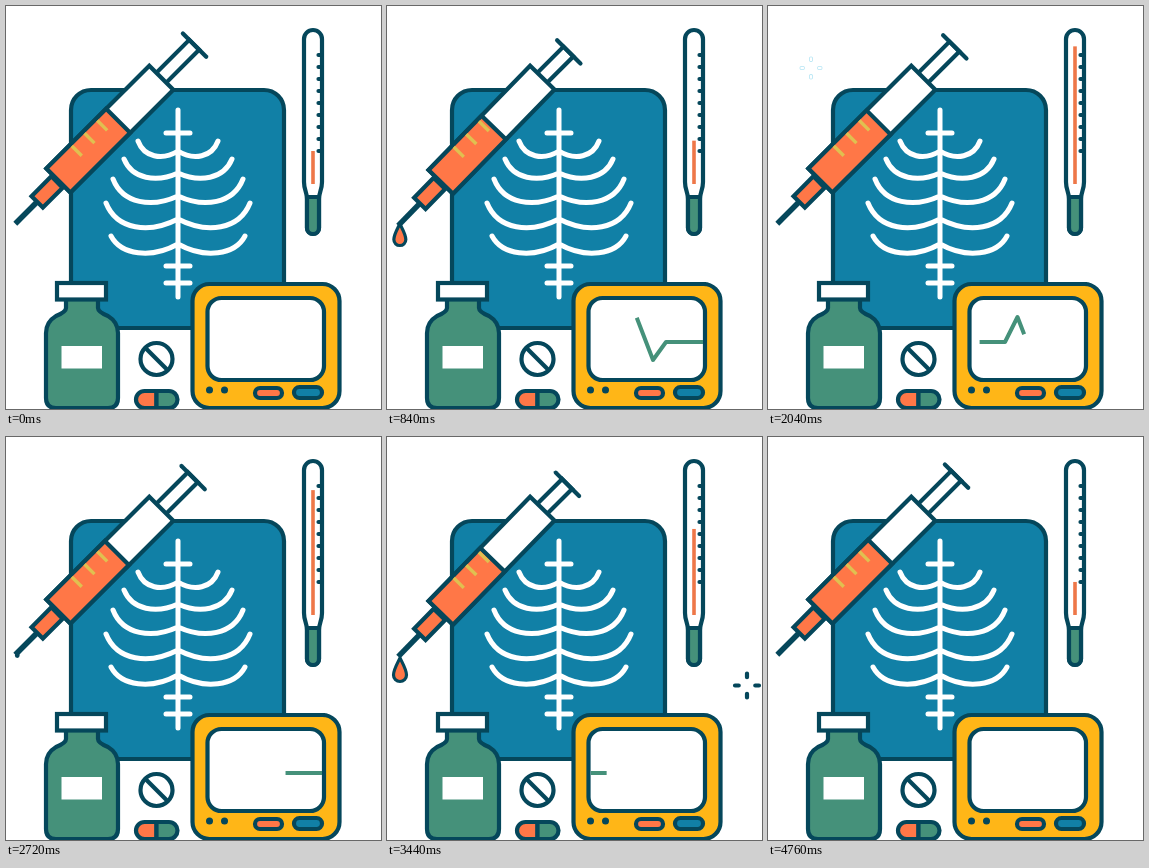
Recreate the animation shown at these times as an HTML page. Size 375x403 px, loop 4.8 s.

```html
<!DOCTYPE html>
<html>
<head>
<meta charset="utf-8">
<title>Medical tools</title>
<style>
html, body { margin: 0; width: 100%; height: 100%; overflow: hidden; background: #fff; }
svg { display: block; width: 375px; height: 403px; }
.line { stroke: #05475b; stroke-width: 4.2; }
.round { stroke-linecap: round; stroke-linejoin: round; }
.none { fill: none; }
.white { fill: #fff; }
.blue { fill: #1180a6; }
.green { fill: #45917a; }
.orange { fill: #ff7747; }
.yellow { fill: #ffb617; }
.navy { fill: #05475b; }
</style>
</head>
<body>
<svg viewBox="0 0 375 403">
  <rect class="line blue" x="65" y="84" width="213" height="238" rx="20"/>
  <path id="ribs" class="none round" stroke="#fff" stroke-width="5"/>

  <path id="drop" class="line orange round" vector-effect="non-scaling-stroke" style="stroke-width:3.2"
    d="M0 0C4 8 6.5 12 6.5 17A6.5 6.5 0 0 1-6.5 17C-6.5 12-4 8 0 0Z"/>

  <g class="line" transform="translate(10 217) rotate(-45)">
    <g id="plunger">
      <path class="white" d="M190-7H252V7H190Z"/>
      <path class="round" d="M252-16V17"/>
    </g>
    <g id="barrel">
      <path stroke-width="5.5" style="stroke-width:5.5" d="M-1 0H30"/>
      <rect class="orange" x="30" y="-8" width="28" height="16"/>
      <rect class="white" x="60" y="-17" width="145.5" height="34"/>
      <rect id="liquid" class="orange" x="60" y="-17" height="34"/>
      <path style="stroke:#e0c050;stroke-width:3.4" d="M94-15V-1M112-15V-1M130-15V-1"/>
    </g>
  </g>

  <g class="line">
    <path class="white" d="M298 33A9 9 0 0 1 316 33V176C316 184 313 186 313 193V222A6 6 0 0 1 301 222V193C301 186 298 184 298 176Z"/>
    <path class="green" d="M301 191H313V222A6 6 0 0 1 301 222Z"/>
    <path id="ticks" class="none round"/>
  </g>
  <path id="mercury" stroke="#ee7748" stroke-width="3.6"/>

  <g class="line">
    <path class="green" d="M60 293V302Q60 306 50 310Q40 316 40 327V392Q40 402 50 402H102Q112 402 112 392V327Q112 316 102 310Q92 306 92 302V293Z"/>
    <rect class="white" x="51" y="277" width="49" height="16.5"/>
    <rect class="white" x="55.5" y="340" width="40.5" height="22.5" stroke="none"/>
    <circle class="white" cx="150.5" cy="353" r="16"/>
    <path d="M139 341.5L162 364.5"/>
    <path class="orange" d="M150.5 385H138.5A8.5 8.5 0 0 0 138.5 402H150.5Z"/>
    <path class="green" d="M150.5 385H163A8.5 8.5 0 0 1 163 402H150.5Z"/>

    <rect class="yellow" x="186.5" y="278" width="147" height="124" rx="17"/>
    <rect class="white" x="201.5" y="292" width="116.5" height="82" rx="14"/>
    <rect class="orange" x="249" y="382" width="27" height="10" rx="5"/>
    <rect class="blue" x="288" y="381" width="28" height="11" rx="5.5"/>
  </g>
  <circle class="navy" cx="203.5" cy="384" r="3.5"/>
  <circle class="navy" cx="218.5" cy="384" r="3.5"/>
  <path id="pulse" class="none" stroke="#45917a" stroke-width="4" stroke-linejoin="round" pathLength="1"
    d="M203.5 336H237L249.5 311L266 354L279 336H316"/>

  <path id="sparkRight" class="line none round"/>
  <g class="none round">
    <path id="sparkLeft" stroke="#b5e5f4" stroke-width="4"/>
    <path id="sparkCore" stroke="#fff" stroke-width="2.4"/>
  </g>
</svg>
<script>
const el = id => document.getElementById(id);
const draw = (id, d) => el(id).setAttribute('d', d);
const clamp = x => Math.min(1, Math.max(0, x));
const span = (t, from, to) => clamp((t - from) / (to - from));
const ease = p => (1 - Math.cos(Math.PI * p)) / 2;

// Each row: half width, end height, sag, height at the spine.
const ribRows = [[40, 135, 16, 145], [54, 153, 20, 167], [65, 173, 25, 190], [72, 197, 27, 213], [67, 230, 19, 238]];
let ribs = 'M172 104V291M160 127H184M160 260H184M160 277H184';
for (const [w, y, sag, join] of ribRows) {
  for (const side of [-1, 1]) {
    const x = k => 172 + side * w * k;
    ribs += `M${x(1)} ${y}C${x(.85)} ${y + sag} ${x(.4)} ${y + sag + 4} ${x(0)} ${join}`;
  }
}
draw('ribs', ribs);

let ticks = '';
for (let y = 49; y <= 145; y += 12) ticks += `M312.5 ${y}H315`;
draw('ticks', ticks);

function sparkle(cx, cy, size, p) {
  if (p <= 0 || p >= 1) return '';
  const outer = size * ease(clamp(p * 3));
  const inner = outer * (.25 + .75 * p);
  return [[1, 0], [-1, 0], [0, 1], [0, -1]].map(([x, y]) =>
    `M${cx + x * inner} ${cy + y * inner}L${cx + x * outer} ${cy + y * outer}`).join('');
}

function render(now) {
  const t = now % 4800, pump = t % 2400, beat = t % 1600;

  const push = ease(pump / 1200) * 12;
  el('plunger').setAttribute('transform', `translate(${-push})`);
  el('liquid').setAttribute('width', 84.5 - push * .9);

  // The needle sags under the drop and springs back once it falls.
  const sag = ease(span(pump, 320, 840)) - ease(span(pump, 1060, 1400));
  el('barrel').setAttribute('transform', `rotate(${-.75 * sag} 205 0)`);

  const swell = span(pump, 260, 1040);
  const grow = Math.sin(swell * Math.PI / 2);
  const fall = 185 * span(pump, 1060, 1540) ** 2;
  el('drop').setAttribute('transform', `translate(${11 + 2 * grow} ${216.5 + 4.5 * swell ** 4 + fall}) scale(${grow})`);
  el('drop').style.display = grow > 0 && fall < 185 ? '' : 'none';

  const heat = ease(span(t, 520, 2100)) - ease(span(t, 2100, 4800));
  draw('mercury', `M307 178V${145 - 105 * heat}`);

  const head = ease(span(beat, 100, 800));
  const tail = span(beat, 215, 1240) ** 2;
  el('pulse').style.display = head > tail ? '' : 'none';
  el('pulse').setAttribute('stroke-dasharray', `0 ${tail} ${head - tail} 2`);

  draw('sparkRight', sparkle(360, 248.5, 12, span(pump, 845, 1180)));
  const left = sparkle(43, 62, 9.5, span(pump, 1300, 2220));
  draw('sparkLeft', left);
  draw('sparkCore', left);
}

function frame() {
  render(performance.now());
  requestAnimationFrame(frame);
}
frame();
</script>
</body>
</html>
```
